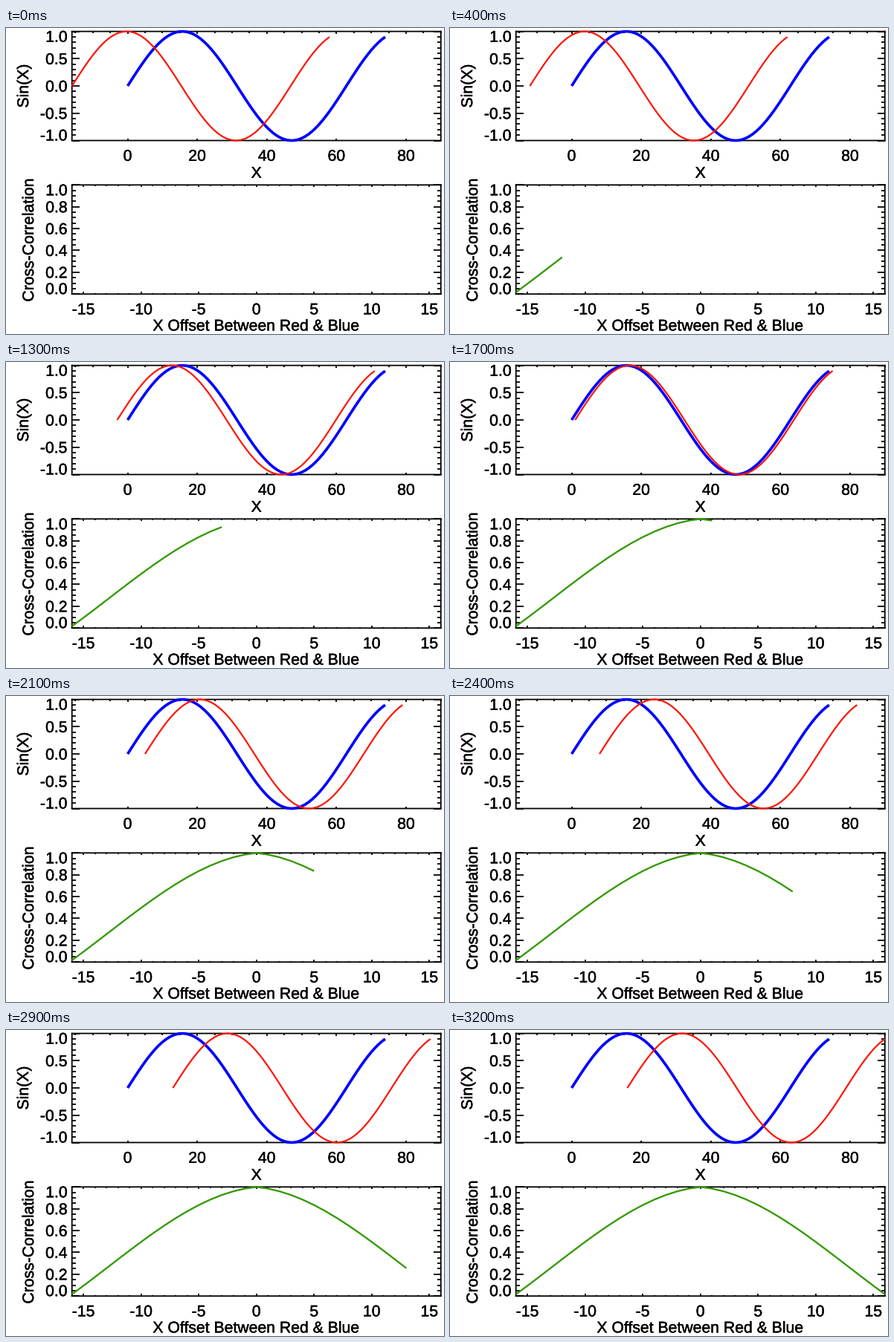
A matplotlib script that plays this animation: 589 by 412 pixels, repeating every 3300 ms.

```python
import numpy as np
import matplotlib.pyplot as plt
from matplotlib.animation import FuncAnimation
from matplotlib.patheffects import withStroke
from matplotlib.ticker import MultipleLocator

W, H, DPI = 589, 412, 64
PX = 72 / DPI                      # points per pixel
LEFT, RIGHT, HEIGHT = 88.7, 584.8, 146.9
CAP = 15                           # digit height in pixels
MAX_LAG, N = 16, 75

plt.rcParams["font.family"] = "Liberation Sans"
fig = plt.figure(figsize=(W / DPI, H / DPI), dpi=DPI, facecolor="white")
heavier = [withStroke(linewidth=0.45 * PX, foreground="black")]


def label(x, y, text, ha="center", rotation=0):
    """Text with its baseline at pixel (x, y), measured from the top left."""
    fig.text(x / W, 1 - y / H, text, ha=ha, va="baseline", rotation=rotation,
             rotation_mode="anchor", fontsize=21.2 * PX, color="black",
             path_effects=heavier)


def panel(top, xlim, ylim, xstep, ystep):
    """Boxed axes; each step is a (major, minor) pair."""
    ax = fig.add_axes([LEFT / W, 1 - (top + HEIGHT) / H,
                       (RIGHT - LEFT) / W, HEIGHT / H])
    ax.set(xlim=xlim, ylim=ylim, facecolor="none")
    for axis, (major, minor), size in ((ax.xaxis, xstep, 3), (ax.yaxis, ystep, 10)):
        axis.set_major_locator(MultipleLocator(major))
        axis.set_minor_locator(MultipleLocator(minor))
        for which, length in (("major", size), ("minor", size / 2)):
            axis.set_tick_params(which=which, direction="in", length=length * PX,
                                 width=1.8 * PX, labelbottom=False, labelleft=False)
    ax.tick_params(which="both", top=True, right=True)
    for spine in ax.spines.values():
        spine.set(linewidth=1.8 * PX, snap=False)

    first = np.ceil(xlim[0] / xstep[0]) * xstep[0]
    for v in np.arange(first, xlim[1], xstep[0]):
        x = LEFT + (v - xlim[0]) / (xlim[1] - xlim[0]) * (RIGHT - LEFT)
        label(x, top + HEIGHT + 27.3, f"{v + 0:.0f}")

    # The outermost y labels sit inside the box.
    count = round((ylim[1] - ylim[0]) / ystep[0])
    for i in range(count + 1):
        v = ylim[0] + i * ystep[0]
        y = top + HEIGHT * (1 - i / count) + CAP / 2
        y = min(max(y, top + CAP - 1), top + HEIGHT)
        label(82.7, y, f"{v:.1f}", ha="right")
    return ax


def curve(ax, color, width, z):
    return ax.plot([], [], color=color, lw=width * PX, zorder=z, clip_on=False,
                   solid_capstyle="butt", solid_joinstyle="round")[0]


x = np.arange(N)
wave = np.sin(x / 10)
dev = wave - wave.mean()
lags = np.arange(-MAX_LAG, MAX_LAG + 1)
corr = np.correlate(dev, dev, "full")[N - 1 + lags] / np.sum(dev ** 2)

upper = panel(4.6, (-16, 90), (-1, 1), (20, 5), (0.5, 0.1))
lower = panel(211.3, (-16, 16), (0, 1), (5, 1), (0.2, 0.05))
label(336.7, 201.7, "X")
label(336.7, 407.4, "X Offset Between Red & Blue")
label(30, 78, "Sin(X)", rotation=90)
label(37, 285.3, "Cross-Correlation", rotation=90)

blue = curve(upper, "#0000ff", 3.7, 5)
red = curve(upper, "#ff1400", 2.2, 6)
green = curve(lower, "#339900", 2.3, 5)
blue.set_data(x, wave)


def update(i):
    red.set_data(x + lags[i], wave)
    green.set_data(lags[:i + 1], corr[:i + 1])
    return red, green


anim = FuncAnimation(fig, update, frames=len(lags), interval=100,
                     repeat=True, repeat_delay=0, blit=False)
plt.show()
```
